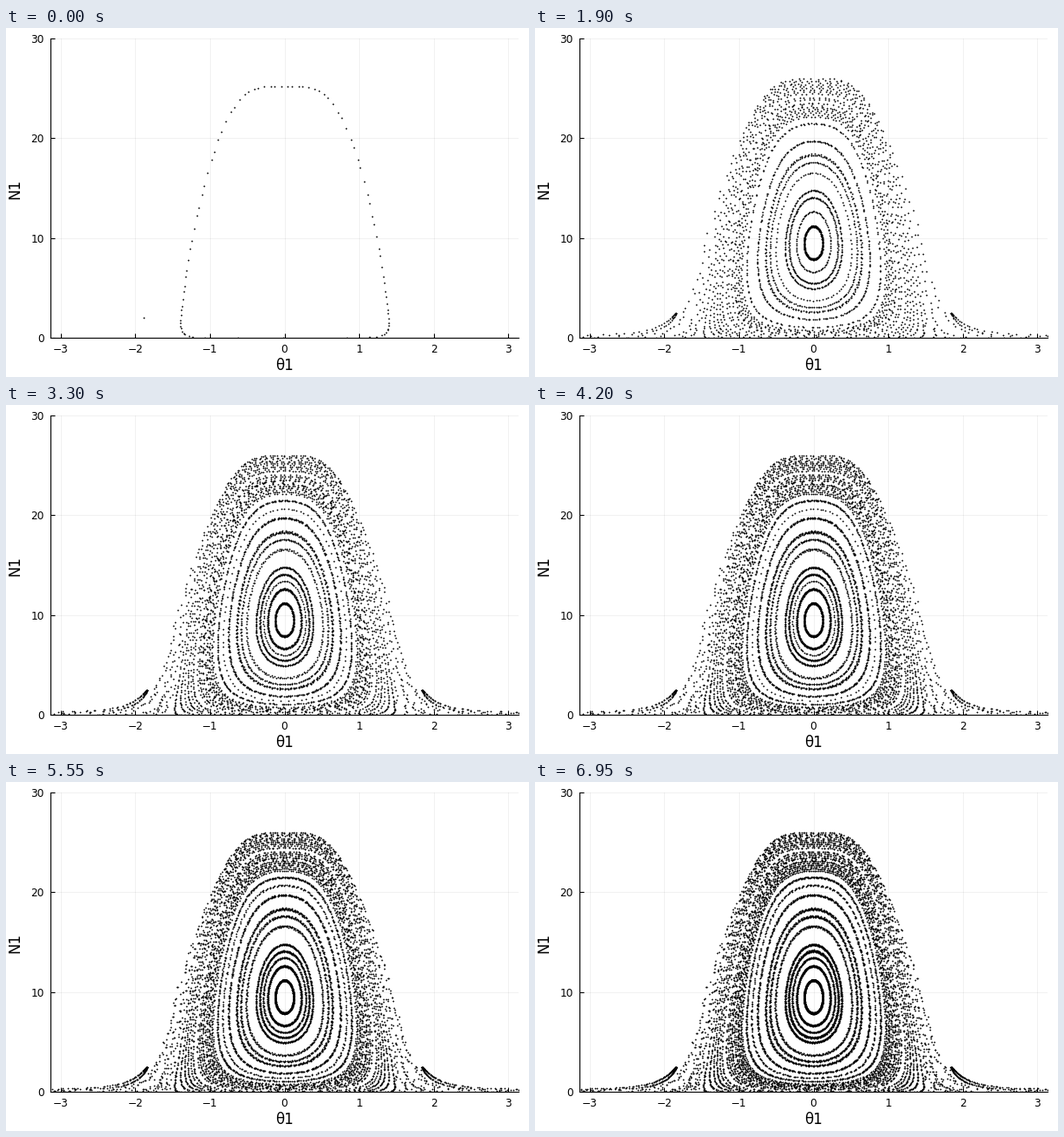
These frames come from a looping animation (600 px wide and 400 px high, 7 s). A matplotlib script:

```python
import matplotlib.pyplot as plt
import numpy as np
from matplotlib.animation import FuncAnimation

FRAMES, INTERVAL, POINTS = 140, 50, 90
GOLDEN = (3 - 5**0.5) / 2
LEVELS = 21  # distinct outer curves
A_MAX = 2.79
INNER = [11.2, 14.1, 14.7, 17.6, 18.3, 19.7, 21.5, 12.6, 16.6, 13.4, 20.7]

rng = np.random.default_rng(7)
k = np.arange(POINTS)


def center(a):
    return 3.082 - 0.0735 * a**2 - 5.5e-5 * a**8


# Half-width of an invariant curve, looked up by the N1 value at its top.
widths = np.linspace(0, A_MAX, 400)
tops = (widths + center(widths)) ** 2


def curve(a, u):
    """Egg-shaped closed curve in the plane sqrt(N) * (cos, sin)."""
    phi = u + 0.22 * a * np.sin(u)
    cos, sin = np.cos(phi), np.sin(phi)
    height = 1.42 * a + 0.018 * a**3 - 4.4e-4 * a**7
    skew = 0.05 * a**2 + 1.1e-4 * a**8
    x = center(a) + a * cos - skew * sin**2 * (1 - cos) / 2
    return x, height * sin


def ring(top):
    a = np.interp(top, tops, widths)
    if top > 25.4:  # chaotic layer
        a = np.clip(a + rng.normal(0, 0.02, POINTS), 0, A_MAX)
    return curve(a, rng.uniform(0, 6.28) + 2 * np.pi * GOLDEN * k)


def islands(top, count=43, size=0.03):
    a = np.interp(top, tops, widths)
    w = rng.uniform(0, 6.28) + 0.9 * k
    u = 2 * np.pi * 16 / count * k
    return curve(a + size * np.cos(w), u + size * np.sin(w))


def sliver():
    """Thin island beside the outer boundary."""
    t = rng.uniform(0, 6.28) + 2 * np.pi * GOLDEN * k
    x = -0.53 + 0.1 * np.sin(t) ** 2 + 0.05 * np.cos(t)
    return x, 1.52 * np.sin(t)


def orbit(i):
    """Alternate between outer and inner curves, opening new inner ones."""
    j = i // 2
    if i % 2:
        opened = min(len(INNER), 7 + 2 * (i // 26))
        x, y = ring(INNER[j % opened] + rng.normal(0, 0.06))
    else:
        top = 22 + 4 * ((0.8 + j * 8 / LEVELS) % 1)
        if j % LEVELS == 2:
            x, y = sliver()
        elif j % LEVELS == 4:
            x, y = islands(top)
        else:
            x, y = ring(top)
    return np.column_stack([np.arctan2(y, x), x**2 + y**2])


dots = np.vstack([orbit(i) for i in range(FRAMES)])
dots[0] = -1.89, 2.0  # starting condition

plt.rcParams.update({"font.family": "DejaVu Sans", "font.size": 8.7})
fig = plt.figure(figsize=(6, 4), dpi=100, facecolor="white")
ax = fig.add_axes([50.7 / 600, 44.6 / 400, 537.6 / 600, 343.7 / 400])
ax.set(xlim=(-np.pi, np.pi), ylim=(0, 30),
       xticks=range(-3, 4), yticks=range(0, 31, 10))
ax.set_axisbelow(True)
ax.grid(color="black", alpha=0.08, linewidth=0.5)
ax.tick_params(direction="in", length=3.6, width=0.8, pad=5)
ax.spines[["top", "right"]].set_visible(False)
ax.spines[["left", "bottom"]].set_linewidth(0.8)
label = dict(size=12, ha="center", va="center")
fig.text(319.5 / 600, 13.5 / 400, "θ1", **label)
fig.text(10.5 / 600, 216 / 400, "N1", rotation=90, **label)
cloud, = ax.plot([], [], "o", color="black", markersize=1.3,
                 markeredgewidth=0)


def draw(i):
    cloud.set_data(*dots[:(i + 1) * POINTS].T)
    return cloud,


anim = FuncAnimation(fig, draw, frames=FRAMES, interval=INTERVAL,
                     repeat=True, repeat_delay=0)
plt.show()
```
